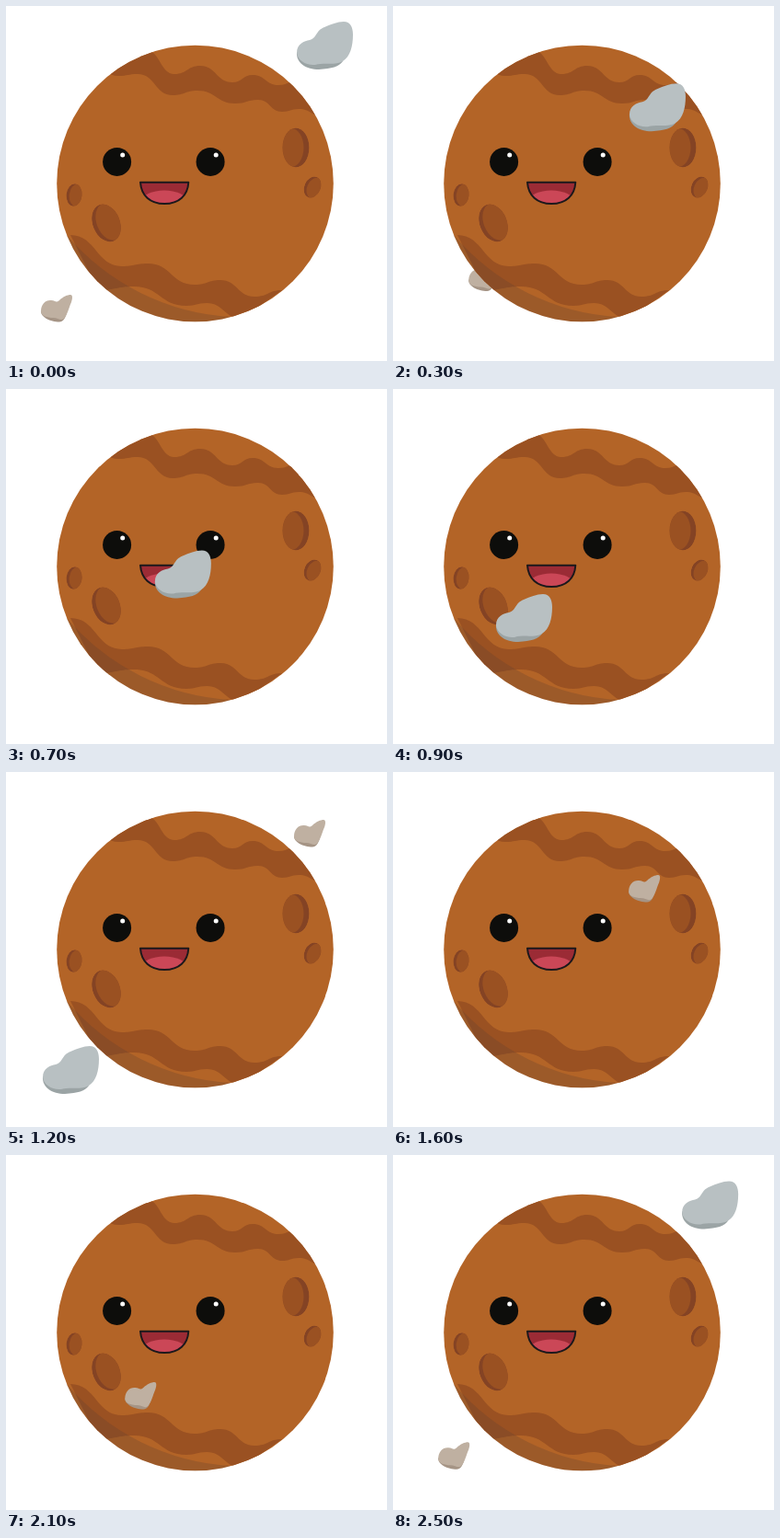
An HTML page for the animation above (2600 ms loop, 414x386 px).

```html
<!DOCTYPE html>
<html lang="en">
<head>
<meta charset="utf-8">
<title>Planet and rocks</title>
<style>
  html, body { margin: 0; width: 100%; height: 100%; overflow: hidden; background: #fff; }
  svg { display: block; width: 414px; height: 386px; }
  .ground { fill: #b36427; }
  .dark { fill: #9a5122; }
  .pit { fill: #844324; }
</style>
</head>
<body>
<svg viewBox="0 0 414 386">
  <defs>
    <circle id="ball" cx="205.5" cy="193" r="150.3"/>
    <path id="mouth" d="M146 191.7H198.3C197.5 206 188 215 172.2 215S147 206 146 191.7Z"/>
    <clipPath id="disc"><use href="#ball"/></clipPath>
    <clipPath id="lips"><use href="#mouth"/></clipPath>
  </defs>
  <g id="back"></g>
  <use href="#ball" class="ground"/>
  <g clip-path="url(#disc)">
    <g id="bands" class="dark"></g>
    <path d="M66 249A253 253 0 0 0 245 338V380H30V249Z" fill="#583c30" opacity=".25"/>
  </g>
  <g id="craters"></g>
  <g id="eyes"></g>
  <g clip-path="url(#lips)">
    <use href="#mouth" fill="#9b2b35"/>
    <ellipse cx="172" cy="212" rx="24" ry="11.5" fill="#cb4757"/>
  </g>
  <use href="#mouth" fill="none" stroke="#1b181b" stroke-width="2" stroke-linejoin="round"/>
  <g id="front"></g>

  <g id="big">
    <path fill="#9ba4a5" d="M0 33C-1 45 10 52 24 52C38 51 46 49 50 43L30 30Z"/>
    <path fill="#b8c0c2" d="M0 34C0 24 8 21 14 20C22 18 20 10 30 6C37 3 44 0 51 0C58 0 61 6 61 14C61 27 58 38 50 43C42 48 30 44 20 47C10 48 1 42 0 34Z"/>
  </g>
  <g id="small">
    <path fill="#a59485" d="M0 17C-1 24 10 29.5 20 29.5C24 29.5 26 26 28 20L12 14Z"/>
    <path fill="#bfb0a1" d="M0 18C0 10 5 5.5 11 6C16 6.5 16 9 20 6C24 2 29 0 32 0C35 0 34 5 33 8C30 15 29 21 25 26C22 29 18 25 13 25C7 25 0 23 0 18Z"/>
  </g>
</svg>
<script>
const $ = id => document.getElementById(id);

function add(parent, tag, attrs) {
  const el = document.createElementNS('http://www.w3.org/2000/svg', tag);
  for (const k in attrs) el.setAttribute(k, attrs[k]);
  return parent.appendChild(el);
}

// Wavy line that is level at every crest and trough
function wave(turns) {
  return turns.map(([x, y], i) => {
    if (!i) return `${x} ${y}`;
    const [px, py] = turns[i - 1], mid = (px + x) / 2;
    return `C${mid} ${py} ${mid} ${y} ${x} ${y}`;
  }).join('');
}

function band(top, bottom) {
  add($('bands'), 'path', { d: `M${wave(top)}L${wave(bottom.reverse())}Z` });
}

band([[152, 48], [183, 74], [211, 65], [246, 83], [268, 75], [296, 86], [320, 80]],
     [[100, 70], [122, 76], [143, 74], [181, 97], [208, 92], [249, 106], [274, 102], [300, 115], [318, 112], [345, 120]]);
band([[70, 249], [126, 283], [154, 280], [205, 303], [233, 298], [270, 316], [300, 309]],
     [[100, 309], [139, 305], [196, 326], [218, 323], [256, 340]]);

// lit: sideways shift of the lighter floor
function crater(x, y, rx, ry, tilt, lit) {
  const id = 'pit' + x;
  add(add($('craters'), 'clipPath', { id }), 'ellipse', { rx, ry });
  const g = add($('craters'), 'g', { transform: `translate(${x} ${y}) rotate(${tilt})`, 'clip-path': `url(#${id})` });
  add(g, 'ellipse', { rx, ry, class: 'pit' });
  add(g, 'ellipse', { cx: lit, rx, ry, class: 'dark' });
}
crater(315, 154, 14.5, 21.5, 0, -6);
crater(333, 197, 8.8, 12, 24, 3.2);
crater(74, 205.5, 8.5, 12.3, 6, 3.2);
crater(109, 236, 14.8, 21.2, -22, 4.5);

for (const x of [120.6, 222.1]) {
  add($('eyes'), 'circle', { cx: x, cy: 169.4, r: 15.5, fill: '#0d0d0b' });
  add($('eyes'), 'circle', { cx: x + 6.1, cy: 162, r: 2.5, fill: '#fff' });
}

// Each easing is a pair [a, b] for x and for y; differing pairs bend the path
const ease = (u, [a, b]) => u + u * (1 - u) * (a + b * u);
const wide = [-0.35, 0.93], steep = [-0.34, 1.44];

const rocks = [
  { el: $('big'), home: [316, 17], away: [40, 298],
    go: [[-0.26, 0.27], [-0.04, -0.07]], back: [steep, wide] },
  { el: $('small'), home: [38, 314], away: [313, 52],
    go: [[-0.6, 0.5], [-0.8, 0.6]], back: [wide, steep] }
];

const STEP = 100, STEPS = 26, HALF = 13;

function draw(time) {
  const s = Math.floor(time / STEP) % STEPS;
  const going = s < HALF;
  const u = going ? s / (HALF - 1) : (s - HALF) / HALF;

  rocks.forEach(({ el, home, away, go, back }, i) => {
    const [from, to, curve] = going ? [home, away, go] : [away, home, back];
    const [x, y] = from.map((p, k) => p + (to[k] - p) * ease(u, curve[k]));
    el.setAttribute('transform', `translate(${x} ${y})`);

    // The big rock passes in front on the way out, the small one on the way back
    const layer = going === (i === 0) ? $('front') : $('back');
    if (el.parentNode !== layer) layer.append(el);
  });
}

const start = performance.now();
function tick() {
  draw(performance.now() - start);
  requestAnimationFrame(tick);
}
tick();
</script>
</body>
</html>
```
